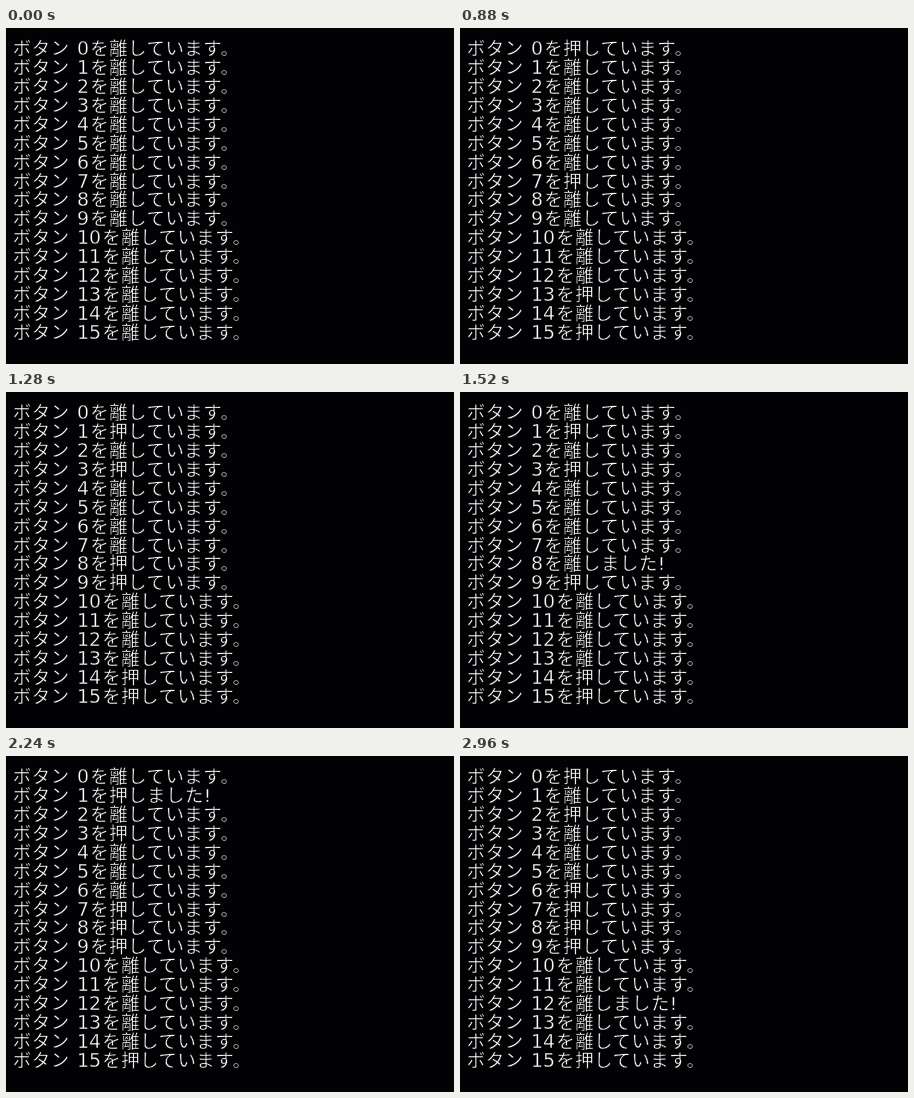
An HTML page that plays this animation: 448 px wide and 336 px high, repeating every 3.04 s.

```html
<!DOCTYPE html>
<html lang="ja">
<head>
<meta charset="utf-8">
<title>ボタン</title>
<style>
html, body { margin: 0; width: 100%; height: 100%; overflow: hidden; background: #020204; }
svg { display: block; width: 100%; height: 100%; }
/* The background-coloured outline thins the letters */
text {
  fill: #fff; stroke: #020204; stroke-width: .35px;
  font: 18.4px "DejaVu Sans", "Noto Sans CJK JP", "Noto Sans CJK", sans-serif;
  letter-spacing: .55px;
}
.num { font-size: 18.9px; letter-spacing: 0; }
</style>
</head>
<body>
<svg viewBox="0 0 448 336"></svg>
<script>
const LOOP = 3040, ROWS = 16, PITCH = 18.93;

// Held buttons as hex digits from each time on; "!" = just pressed, "^" = just released
const steps = [
  [0, ''],
  [640, '1'], [720, '1d'], [800, '017d'], [880, '07df'], [960, '017de'],
  [1040, '179!de'], [1120, '01789de'], [1200, '01389ef!'], [1280, '1389ef'],
  [1440, '01389e'], [1520, '138^9ef'], [1600, '1379d!e'], [1680, '13679de'],
  [1760, '136789de'], [1840, '12!36789de'], [1920, '123789de'],
  [2000, '023789df!'], [2080, '03789df'], [2160, '3789f'], [2240, '1!3789f'],
  [2320, '013789f'], [2400, '012789f'], [2560, '026789f'],
  [2720, '026789c!f'], [2800, '26789c'], [2880, '026789cf'], [2960, '026789c^f']
];

const svg = document.querySelector('svg');

function addText(x, y, str, cls = '') {
  const t = document.createElementNS('http://www.w3.org/2000/svg', 'text');
  t.setAttribute('x', x);
  t.setAttribute('y', y);
  t.setAttribute('class', cls);
  t.textContent = str;
  svg.append(t);
  return t;
}

const states = Array.from({ length: ROWS }, (_, i) => {
  const y = Math.round(27 + i * PITCH);
  addText(6.8, y, 'ボタン');
  addText(71, y, i, 'num');
  return addText(i < 10 ? 84.2 : 96.2, y, '');
});

function message(held, i) {
  const key = i.toString(16);
  if (held.includes(key + '^')) return 'を離しました!';
  if (held.includes(key + '!')) return 'を押しました!';
  return held.includes(key) ? 'を押しています。' : 'を離しています。';
}

let shown;
function draw(now) {
  const t = now % LOOP;
  const step = steps.findLast(s => s[0] <= t);
  if (step !== shown) {
    shown = step;
    states.forEach((el, i) => { el.textContent = message(step[1], i); });
  }
}

draw(0);
const start = performance.now();
requestAnimationFrame(function tick(now) {
  draw(Math.max(0, now - start));
  requestAnimationFrame(tick);
});
</script>
</body>
</html>
```
